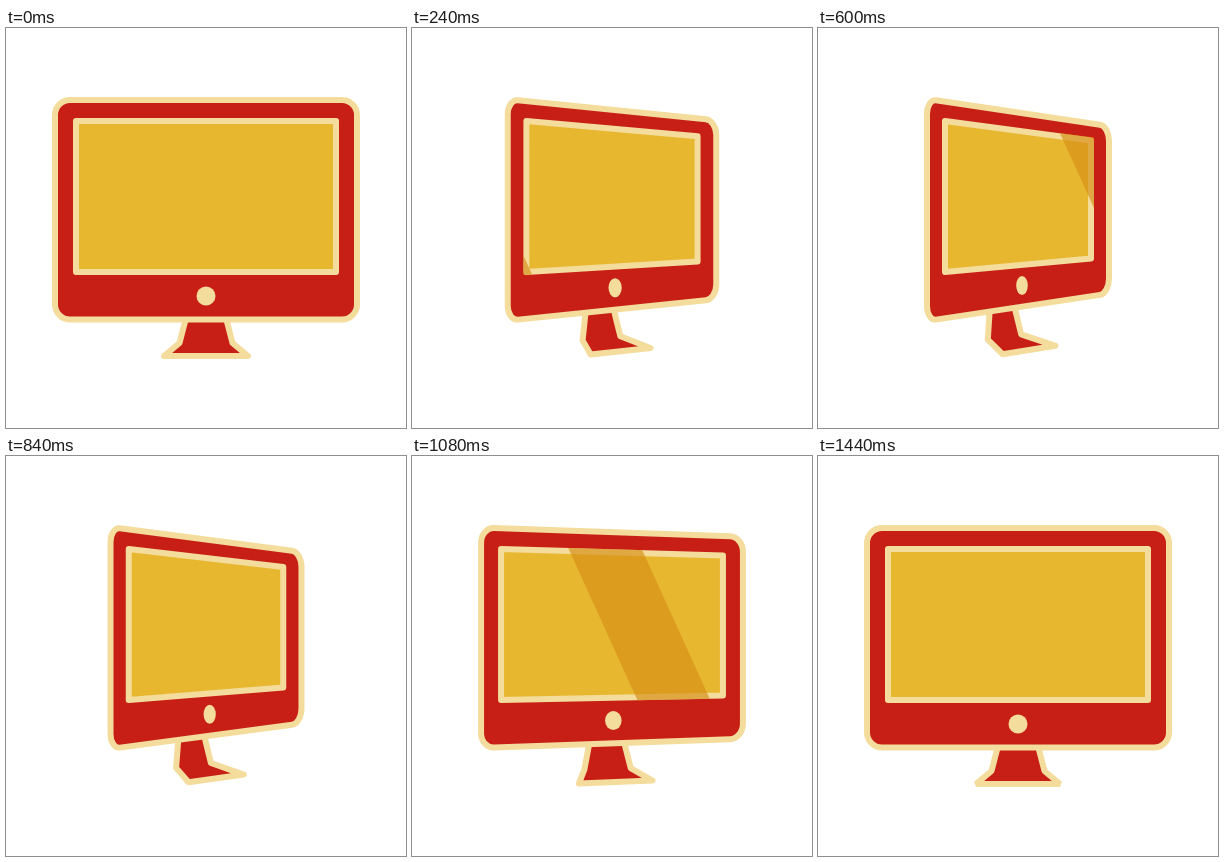
These frames come from a looping animation (400 px wide and 400 px high, 2.62 s). An HTML page with a canvas:

```html
<!DOCTYPE html>
<html>
<head>
<meta charset="utf-8">
<title>Turning monitor</title>
<style>
html, body { margin: 0; width: 100%; height: 100%; overflow: hidden; background: #fff; }
canvas { display: block; width: 100vw; height: 100vh; }
</style>
</head>
<body>
<canvas id="stage" width="400" height="400"></canvas>
<script>
const ctx = document.getElementById('stage').getContext('2d');
const CREAM = '#f4dc9c', RED = '#c71f16', YELLOW = '#e8b730', GLARE = 'rgba(214,142,20,.65)';
const LOOP = 2620, STEP = 30, END = 1440, TURN = 600, MID = 200;

const mix = (a, b, p) => a + (b - a) * p;

// Cubic bezier ease (.325, 0, 0, 1)
function ease(x) {
  let lo = 0, hi = 1, s;
  for (let i = 0; i < 30; i++) {
    s = (lo + hi) / 2;
    if (.975 * s * (1 - s) ** 2 + s ** 3 < x) lo = s; else hi = s;
  }
  return s * s * (3 - 2 * s);
}

// Upright panel: sides move in by `inset`, the far right side shrinks by `drop` and `rise`
function panel(half, top, bottom, inset, drop, rise) {
  const l = MID - half + inset, r = MID + half - inset;
  return [[l, top], [r, top + drop], [r, bottom - rise], [l, bottom]];
}

// One end of a stand row; side is -1 (left) or 1 (right)
function foot(side, y, half, shift, lift, p) {
  return [MID + shift * p + side * half * (1 - .37 * p), y - (lift + side * half * .1) * p];
}

function polygon(pts) {
  ctx.beginPath();
  pts.forEach(q => ctx.lineTo(...q));
  ctx.closePath();
}

function toward(a, b, d) {
  const k = d / Math.hypot(b[0] - a[0], b[1] - a[1]);
  return [mix(a[0], b[0], k), mix(a[1], b[1], k)];
}

function rounded(pts, rx, ry) {
  ctx.beginPath();
  pts.forEach((c, i) => {
    const prev = pts[(i + 3) % 4], next = pts[(i + 1) % 4];
    const [r1, r2] = i % 2 ? [rx, ry] : [ry, rx];
    ctx.lineTo(...toward(c, prev, r1));
    ctx.bezierCurveTo(...toward(c, prev, r1 * .45), ...toward(c, next, r2 * .45), ...toward(c, next, r2));
  });
  ctx.closePath();
}

function paint(color, join = 'round') {
  ctx.fillStyle = color;
  ctx.lineJoin = join;
  ctx.fill();
  ctx.stroke();
}

// Slanted band that crosses the screen at a steady pace and brakes at the end
function glare(ms) {
  const u = (ms - 180) / 660;
  if (u < 0 || u > 1) return;
  const left = -69 + 505 * u - 100 * u ** 4;
  const at = (x, y) => [x + (y - 92) * .4545, y];
  polygon([at(left, 80), at(left + 73, 80), at(left + 73, 260), at(left, 260)]);
  ctx.fillStyle = GLARE;
  ctx.fill();
}

function draw(t) {
  const p = ease(Math.max(0, 1 - Math.abs(t - TURN) / TURN));
  ctx.clearRect(0, 0, 400, 400);
  ctx.strokeStyle = CREAM;
  ctx.lineWidth = 6;
  ctx.miterLimit = 2;

  const rows = [[288, 19.5, -16, 8], [315, 26.5, -13.5, 6], [328, 42, 11, 6]];
  const side = s => rows.map(row => foot(s, ...row, p));
  polygon([...side(1), ...side(-1).reverse()]);
  paint(RED, t < END ? 'round' : 'bevel');

  rounded(panel(151, 72 - p, 291.5 + 1.5 * p, 60 * p, 27 * p, 27.5 * p), mix(15, 9, p), 15);
  paint(RED);

  const screen = panel(130, 93, 244, 57 * p, 19.5 * p, 13.5 * p);
  polygon(screen);
  paint(YELLOW);

  ctx.beginPath();
  ctx.ellipse(mix(MID, 204, p), mix(268, 257.5, p), mix(9.5, 5.8, p), 9.5, 0, 0, 7);
  ctx.fillStyle = CREAM;
  ctx.fill();

  ctx.save();
  polygon(screen.map(([x, y], i) => [x + (i % 3 ? 3 : -3), y + (i > 1 ? 3 : -3)]));
  ctx.clip();
  glare(t);
  glare(t - TURN);
  ctx.restore();
}

function tick() {
  const t = performance.now() % LOOP;
  draw(Math.min(END, Math.floor(t / STEP) * STEP));
  requestAnimationFrame(tick);
}
tick();
</script>
</body>
</html>
```
